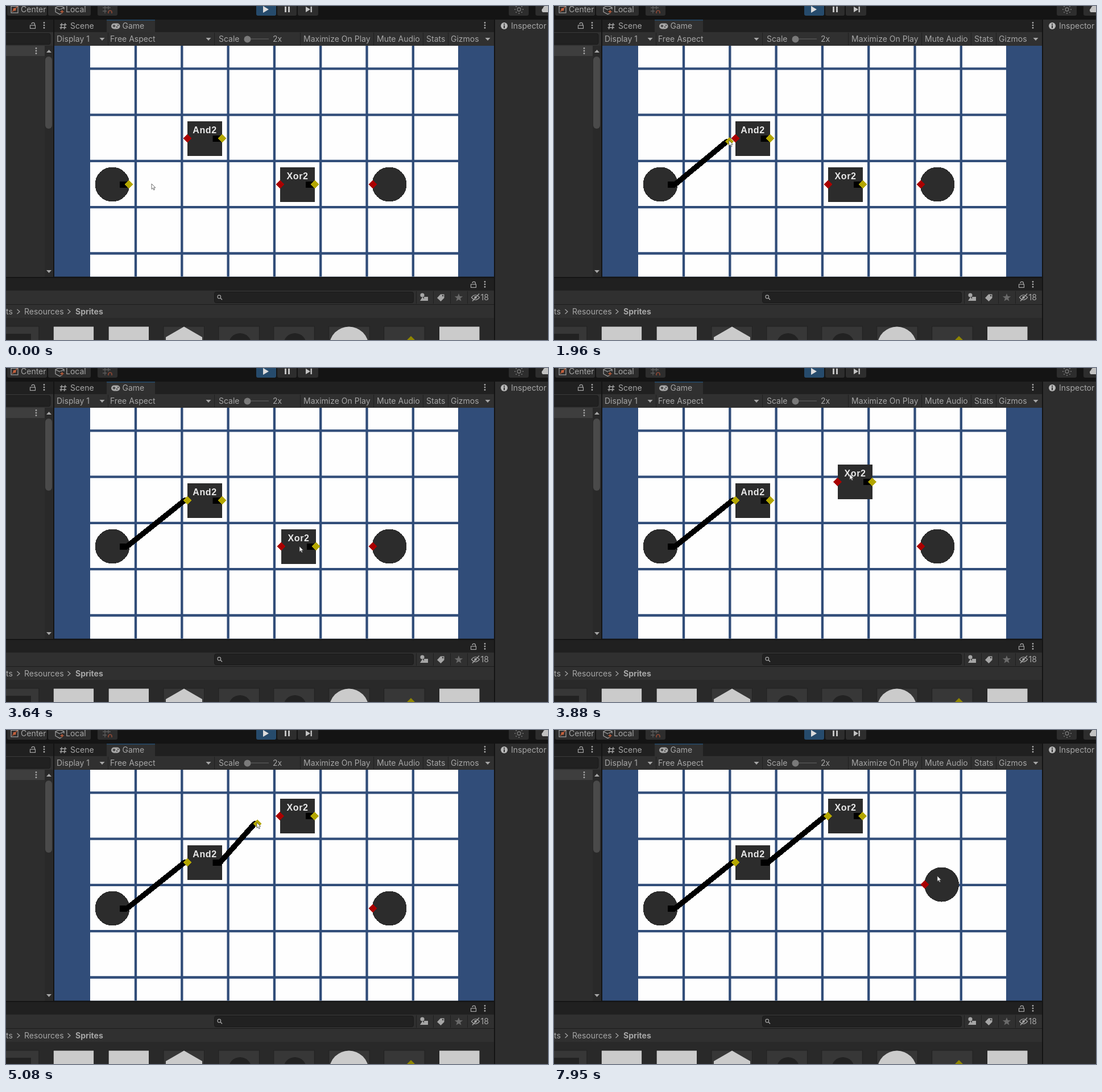
Write an HTML page that moves like this. It is 953 px wide and 588 px high and loops after 8 s.

```html
<!DOCTYPE html>
<html lang="en">
<head>
<meta charset="utf-8">
<title>Logic board editor</title>
<style>
  html, body { margin: 0; width: 100%; height: 100%; overflow: hidden; background: #141414; }
  svg { display: block; width: 953px; height: 588px; }
  text { font: 14px Inter, sans-serif; fill: #a6a6a6; white-space: pre; }
  .bold { font-weight: 700; }
  .chip { font: bold 16px "Liberation Sans", Arial, sans-serif; letter-spacing: .6px; fill: #e8e8e8; text-anchor: middle; }
  .crisp { shape-rendering: crispEdges; }
</style>
</head>
<body>
<svg id="stage" viewBox="0 0 953 588"></svg>
<script>
const stage = document.getElementById('stage');
const BLUE = '#314d79', DARK = '#2c2c2c', RED = '#a90000', GOLD = '#b3a600', INK = '#a6a6a6', EDGE = '#191919';
const BAR = '#303030', TAB = '#202020', PANEL = '#2d2d2d', FIELD = '#212121', PALE = '#cbcbcb', RUST = '#c4603c';

function add(tag, attrs, parent = stage) {
  const el = document.createElementNS('http://www.w3.org/2000/svg', tag);
  for (const k in attrs) el.setAttribute(k, attrs[k]);
  return parent.appendChild(el);
}
const rect = (x, y, width, height, fill, more, parent) => add('rect', { x, y, width, height, fill, ...more }, parent);
const dot = (cx, cy, r, fill, more, parent) => add('circle', { cx, cy, r, fill, ...more }, parent);
const shape = (d, fill, more, parent) => add('path', { d, fill, ...more }, parent);
const line = (d, color = INK, width = 1.4, more) => shape(d, 'none', { stroke: color, 'stroke-width': width, ...more });
function label(x, y, str, cls = '', parent = stage) {
  add('text', { x, y, class: cls }, parent).textContent = str;
}
const place = (el, x, y) => el.setAttribute('transform', `translate(${x} ${y})`);

// ---- editor icons ----
const down = (x, y) => shape(`M${x - 4.5} ${y - 2}h9l-4.5 5z`, INK);
const kebab = (x, y) => [-4.5, 0, 4.5].forEach(d => dot(x, y + d, 1.4, INK));
function lock(x, y) {
  line(`M${x - 2} ${y - 2}a2.7 2.7 0 0 1 5.4 0v2`, INK, 1.2);
  rect(x - 4.5, y, 9, 5.5, 'none', { stroke: INK, 'stroke-width': 1.2 });
}
const vline = (x, y, h) => rect(x, y, 1, h, TAB);
function ring(n, cx, cy, radius, visit) {
  for (let i = 0; i < n; i++) {
    const a = i * 2 * Math.PI / n - Math.PI / 2, r = radius(i);
    visit(cx + r * Math.cos(a), cy + r * Math.sin(a));
  }
}

function topBar() {
  const button = (x, w, fill = PANEL) => rect(x, -6, w, 23, fill, { rx: 3 });
  button(2, 70);
  rect(9, .5, 12, 11.5, 'none', { stroke: INK, 'stroke-width': 1.2 });
  line('M11 10l9-9', RUST, 1.3);
  dot(15, 6, 2.6, RUST);
  label(26, 11, 'Center');

  button(74, 75);
  line('M87 2.5l7.5-3 7.5 3v8l-7.5 4-7.5-4zM87 3l7.5 3.5 7.5-3.5', INK, 1.2);
  rect(95, 6, 8, 7, PANEL);
  line('M98.5 7v6M95.5 10h6', RUST);
  label(105, 11, 'Local');

  button(161, 35);
  line('M174 0v13M180 0v6M170 3h14M170 9h7', '#5c5c5c', 1.3);
  line('M180 13v-2a3 3 0 0 1 6 0v2', '#8a4836', 1.7);

  button(440, 35, '#264b6c');
  shape('M452 0l10 6-10 6z', '#dcdcdc');
  button(477, 34);
  line('M491.5 1v10M497.5 1v10', '#c2c2c2', 3);
  button(513, 36);
  shape('M527 1l8 5-8 5z', '#c2c2c2');
  line('M536.7 1v10', '#c2c2c2', 2.4);

  button(884, 35);
  dot(902, 6, 3, 'none', { stroke: '#777', 'stroke-width': 1.3 });
  ring(8, 902, 6, () => 7, (x, y) => dot(x, y, 1, '#777'));
  button(931, 30);
  shape('M944 11a4 4 0 0 1 0-7a6 6 0 0 1 10-3v10z', '#c2c2c2');
}

function sidePanels() {
  rect(0, 24, 83, 22, TAB);
  rect(0, 46, 83, 431, PANEL);
  rect(0, 46, 83, 24, BAR);
  rect(-6, 48.5, 84, 19, FIELD, { rx: 3, stroke: EDGE });
  rect(0, 70, 68, 18, '#3e3e3e');
  rect(68, 70, 15, 407, '#292929');
  rect(69, 89, 12, 127, '#4a4a4a', { rx: 6 });
  shape('M71 82h9l-4.5-5zM71 465h9l-4.5 5z', INK);
  lock(47, 34); kebab(67, 34); kebab(53, 79);

  rect(860, 24, 93, 564, PANEL);
  dot(876, 35, 6, '#b8b8b8');
  line('M876 31v2M876 34v5', PANEL, 1.9);
  label(888, 40, 'Inspector');
}

function gameHeader() {
  rect(85, 24, 773, 22, TAB);
  rect(177, 24, 85, 22, BAR);
  rect(177, 24, 85, 1.5, '#234a6c');
  rect(85, 46, 773, 24, BAR);
  line('M98 30l-1.5 11M104 30l-1.5 11M95 33h11.5M94.5 38h11.5');
  label(113, 40, 'Scene');
  rect(185, 30.5, 15.5, 10, INK, { rx: 5 });
  line('M190 33v4.5M187.7 35.2h4.6', BAR);
  dot(195, 37, 1.1, BAR); dot(197, 34, 1.1, BAR);
  label(204.5, 40, 'Game');
  kebab(842, 34);

  const item = (x, str, end) => { label(x, 63, str); vline(end, 47, 22); };
  item(89, 'Display 1', 179);
  item(183, 'Free Aspect', 366);
  item(374, 'Scale', 517);
  item(523, 'Maximize On Play', 646);
  item(652, 'Mute Audio', 733);
  item(739, 'Stats', 777);
  label(782, 63, 'Gizmos');
  label(469, 63, '2x');
  [169, 356, 847].forEach(x => down(x, 58));
  rect(424, 57, 38, 2, '#4b4b4b');
  dot(424.5, 58.5, 6, '#7a7a7a');
}

function project() {
  rect(0, 479, 858, 22, TAB);
  rect(0, 501, 858, 48, BAR);
  rect(0, 525, 858, 1, '#1c1c1c');
  rect(0, 549, 858, 39, '#292929');
  lock(822, 490); kebab(842, 490);
  rect(366.5, 503.5, 350, 19, FIELD, { rx: 3, stroke: EDGE });
  dot(374.8, 512, 2.8, 'none', { stroke: INK, 'stroke-width': 1.2 });
  line('M377 514l3 3.2');
  for (let x = 721; x < 820; x += 30) vline(x, 502, 22);
  dot(732, 509, 3.6, INK);
  shape('M728 519l4.5-7 4.5 7zM735 512h7v7h-7z', INK);
  shape('M758 514l6-6.5h6.5v6.5l-6 6z', INK);
  dot(768, 510, 1.2, BAR);
  const star = [];
  ring(10, 796, 513.5, i => i % 2 ? 3.2 : 7.6, (x, y) => star.push(`${x.toFixed(1)} ${y.toFixed(1)}`));
  shape(`M${star.join('L')}z`, '#6a6a6a');
  line('M818.5 513q7-8.5 14 0q-7 8.5-14 0z', INK, 1.2);
  dot(825.5, 513, 2.2, INK);
  line('M820 519.5l12-13');
  label(834.5, 518, '18');

  label(0, 543, 'ts');
  line('M19.5 534l4.5 4-4.5 4M108.5 534l4.5 4-4.5 4', INK, 1.2);
  label(32, 543, 'Resources');
  label(122, 543, 'Sprites', 'bold');

  for (let i = 0; i < 9; i++) {
    const pale = [1, 2, 8].includes(i);
    rect(-13.7 + i * 96.9, 564, 71.5, 30, pale ? PALE : '#373737', { stroke: '#222' });
  }
  rect(-2, 577, 46, 12, '#222');
  shape('M281 588v-5l32-18.5 32 18.5v5z', PALE);
  dot(411.5, 596, 20, '#222'); dot(508, 596, 20, '#222');
  dot(603, 599, 34.5, PALE);
  shape('M705 588l7-7 7 7z', '#8f8500');
}

// ---- game board ----
const PITCH = 81.3;
function board() {
  rect(85, 70, 773, 406.5, BLUE);
  rect(148, 70, 647, 406.5, '#fefefe');
  let d = '';
  for (let i = 0; i < 7; i++) d += `M${228 + i * PITCH} 70v406.5`;
  for (let i = 0; i < 5; i++) d += `M148 ${110.3 + i * PITCH}h647`;
  line(d, BLUE, 4.3);
}
const group = () => add('g', { class: 'crisp' });
const diamond = (fill, x, y, parent) => shape(`M${x - 7.5} ${y}l7.5-7.5 7.5 7.5-7.5 7.5z`, fill, { class: 'crisp' }, parent);

// A gate is drawn around its own centre.
function gate(name) {
  const g = group();
  rect(-30.5, -30.5, 61, 61, DARK, {}, g);
  label(0, -9.5, name, 'chip', g);
  rect(14, -5.5, 15, 11, '#000', {}, g);
  return g;
}
function wire(x, y) {
  const path = line('', '#000', 9.5, { class: 'crisp', 'stroke-linejoin': 'bevel' });
  rect(x - 16, y - 5, 13, 11, '#000');
  const tip = group();
  diamond(GOLD, 0, 0, tip);
  return (tx, ty) => {
    path.setAttribute('d', `M${x - 16} ${y}H${x - 3}L${tx - 5} ${ty}H${tx}`);
    place(tip, tx, ty);
  };
}

topBar();
sidePanels();
board();
gameHeader();
project();

dot(187, 314, 30.5, DARK, { class: 'crisp' });
const lamp = group();
dot(0, 0, 30.5, DARK, {}, lamp);
diamond(RED, -29.5, 0, lamp);
const and2 = gate('And2');
place(and2, 349.5, 233.5);
diamond(RED, 319, 233);
const xor2 = gate('Xor2');
diamond(RED, -31, 0, xor2);
diamond(GOLD, 30, 0, xor2);
const wireA = wire(216, 314);
const wireB = wire(379.5, 233);
const cursor = shape('M0 0v9.5l2.2-2 1.6 3.5 1.6-.7-1.6-3.4h3z', '#fff', { stroke: '#4a4a4a', 'stroke-width': .8 });

// ---- motion ----
const LOOP = 8000, STEP = 120;
const smooth = p => p * p * (3 - 2 * p);

// Each move: start time, number of steps, target x, y
function track(home, ...moves) {
  return t => {
    let [px, py] = home;
    for (const [start, steps, x, y] of moves) {
      if (t < start) break;
      const p = smooth(Math.min(1, (Math.floor((t - start) / STEP) + 1) / steps));
      px += (x - px) * p;
      py += (y - py) * p;
    }
    return [px, py];
  };
}

const pointer = track([256, 313],
  [290, 1, 247, 311], [490, 1, 232, 311], [630, 5, 217, 316],
  [1360, 7, 313, 232],                        // pull the first wire
  [2200, 5, 396, 360], [2800, 8, 516, 314],
  [3760, 1, 537, 252], [3880, 1, 520, 187],   // lift the gate
  [4000, 6, 376, 233],
  [4720, 4, 441, 163], [5200, 6, 472, 148],   // pull the second wire
  [6320, 1, 469, 150],
  [6830, 4, 648, 314], [7330, 3, 669, 315], [7950, 1, 674, 257]);
const xorAt = track([512.5, 314],
  [3640, 1, 514.5, 314], [3760, 1, 535, 269.5], [3880, 1, 529.5, 200.5], [4000, 2, 512.5, 151.5]);
const lampAt = track([674, 314], [7950, 1, 681.5, 272]);

function draw(t) {
  const [x, y] = pointer(t);
  const pull = (from, to, home, end) => t < from ? home : t < to ? [x + 1, y + 2] : end;
  place(cursor, x, y);
  place(xor2, ...xorAt(t));
  place(lamp, ...lampAt(t));
  wireA(...pull(1360, 2080, [216, 314], [319, 233]));
  wireB(...pull(4720, 6320, [379.5, 233], [481.5, 151.5]));
}

const began = performance.now();
function tick() {
  draw((performance.now() - began) % LOOP);
  requestAnimationFrame(tick);
}
tick();
</script>
</body>
</html>
```
